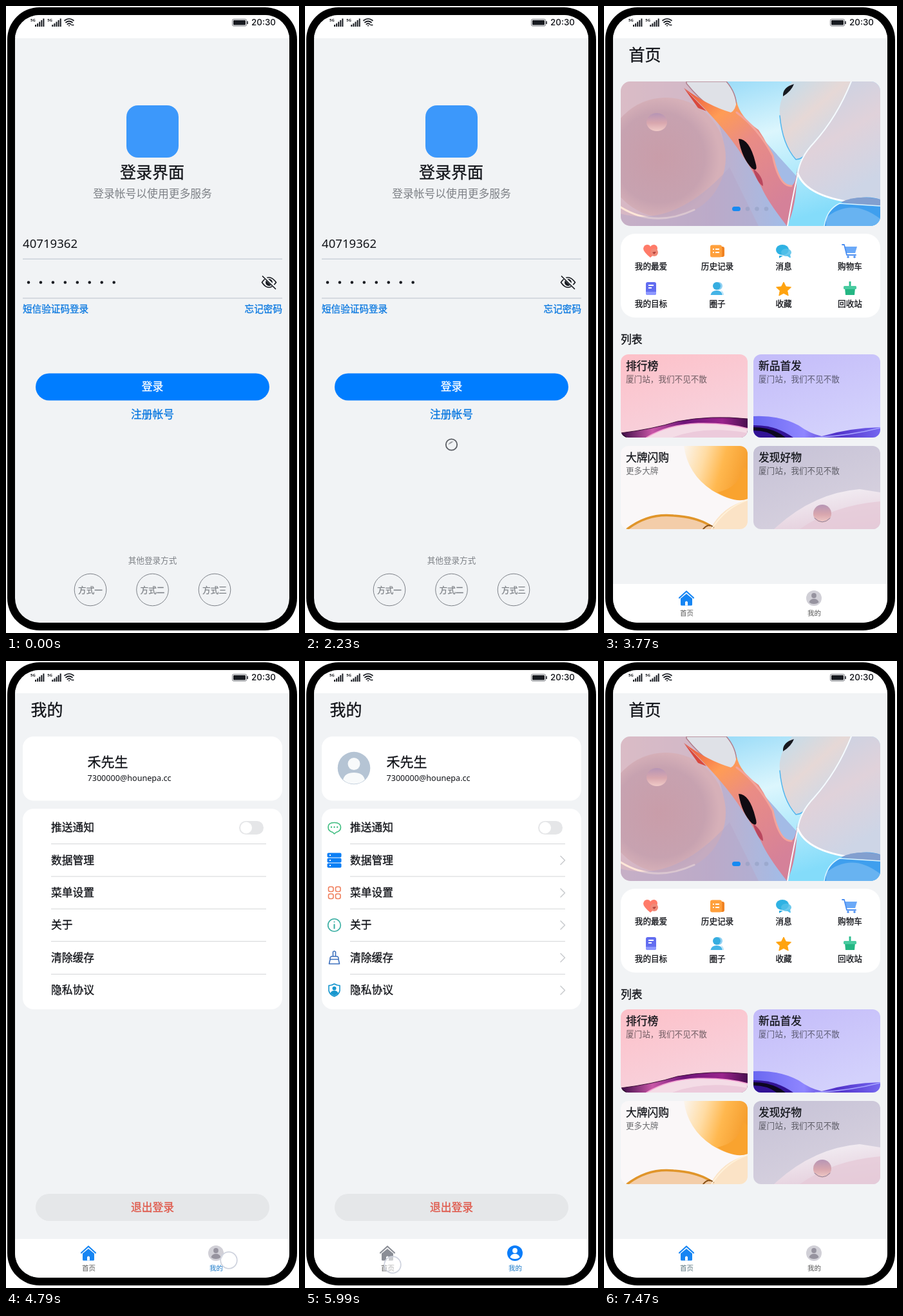
Recreate the animation shown at these times as an HTML page. Size 455 by 972 pixels, loop 8320 ms.

```html
<!DOCTYPE html>
<html lang="zh-CN">
<head>
<meta charset="utf-8">
<title>登录界面</title>
<style>
html,body{margin:0;width:100%;height:100%;overflow:hidden;background:#fff}
svg{display:block;width:100%;height:100%}
text{font-family:"Noto Sans CJK SC","Noto Sans CJK",sans-serif;transform:translateY(.34em);color:#111318;fill:currentColor}
.num{font-family:"Noto Sans","Open Sans",sans-serif;transform:translateY(.36em)}
.clock{font:500 13.4px Inter,sans-serif;transform:translateY(.36em)}
.mid{text-anchor:middle}
.end{text-anchor:end}
.h1{font-size:25px}
.h2{font-size:21px}
.body{font-size:16.8px}
.link{font-size:14.6px}
.small{font-size:12.6px}
.tiny{font-size:10.5px}
.h1,.h2,.link,.bold{stroke:currentColor;stroke-width:.3px}
.blue{color:#0a78e0}
.gray{color:#7d8086}
.white{color:#fff}
.red{color:#df5648}
.line{fill:none;stroke-linecap:round;stroke-linejoin:round}

/* 8320 ms loop: sign in, push the home page, visit the second tab, return */
.step,.login,.push,.ring{animation:8320ms infinite}
.step{animation-timing-function:step-end}
.login{animation-name:leave}
.push{animation-name:enter}
.home{animation-name:home}
.mine{animation-name:mine}
.late{animation-name:late}
.early{animation-name:early}
.press{animation-name:press}
.load{animation-name:load}
.comet{animation:spin 1188.57ms linear infinite}
.ring{animation-name:tap;animation-timing-function:linear}
.homeLabel{animation-name:homeLabel}
.mineLabel{animation-name:mineLabel}
@keyframes leave{
 0%,36.2%{transform:none;animation-timing-function:cubic-bezier(.2,0,.2,1)}
 43.5%,100%{transform:translateX(-110px)}}
@keyframes enter{
 0%,36.2%{transform:translateX(430px);animation-timing-function:cubic-bezier(.2,0,.2,1)}
 43.5%,100%{transform:none}}
@keyframes home{0%{visibility:visible}56.9%{visibility:hidden}73.1%,100%{visibility:visible}}
@keyframes mine{0%{visibility:hidden}56.9%{visibility:visible}73.1%,100%{visibility:hidden}}
@keyframes late{0%{visibility:hidden}58.2%{visibility:visible}73.1%,100%{visibility:hidden}}
@keyframes early{0%{visibility:visible}58.2%{visibility:hidden}73.1%,100%{visibility:visible}}
@keyframes press{0%{fill:#007dff}23.4%{fill:#0071e6}25.2%,100%{fill:#007dff}}
@keyframes load{0%{visibility:hidden}25.2%{visibility:visible}43.5%,100%{visibility:hidden}}
@keyframes spin{to{transform:rotate(360deg)}}
@keyframes homeLabel{0%{color:#555}73.1%{color:#1878c8}86.4%,100%{color:#57727c}}
@keyframes mineLabel{0%{color:#555}56.9%{color:#1878c8}73.1%,100%{color:#555}}
@keyframes tap{
 0%,15.6%{transform:translate(262px,640px);opacity:0}
 17%{opacity:1}
 21.5%{transform:translate(240px,598px)}
 24.4%{transform:translate(240px,598px);opacity:1}
 25.2%{transform:translate(240px,598px);opacity:0}
 25.3%,56.2%{transform:translate(340px,923px);opacity:0}
 57.3%,59.5%{transform:translate(346px,929px);opacity:1}
 60.3%{transform:translate(346px,929px);opacity:0}
 60.4%,69.8%{transform:translate(136px,936px);opacity:0}
 70.8%,73%{transform:translate(136px,936px);opacity:1}
 73.8%,100%{transform:translate(136px,936px);opacity:0}}
</style>
</head>
<body>
<svg viewBox="0 0 455 972" preserveAspectRatio="none">
<defs>
 <clipPath id="screen"><rect x="14" y="14" width="426" height="942" rx="38"/></clipPath>
 <clipPath id="bannerClip"><rect x="26" y="117" width="403" height="224" rx="15"/></clipPath>
 <clipPath id="cardClip"><rect width="197" height="129" rx="12"/></clipPath>
 <linearGradient id="haze"><stop stop-color="#d8b8c4"/><stop offset=".35" stop-color="#c2aec9"/><stop offset=".62" stop-color="#a3bbe6"/></linearGradient>
 <linearGradient id="sky" x2=".3" y2="1"><stop stop-color="#9bdcf8"/><stop offset=".4" stop-color="#dcf6fd"/><stop offset="1" stop-color="#84dcfa"/></linearGradient>
 <radialGradient id="orb" cx=".45" cy=".5"><stop stop-color="#c99da9"/><stop offset=".75" stop-color="#c7a2b0"/><stop offset="1" stop-color="#d6b0b8"/></radialGradient>
 <linearGradient id="ribbon" x2=".6" y2="1"><stop stop-color="#e8503c"/><stop offset=".28" stop-color="#ff9c55"/><stop offset=".52" stop-color="#ea8c85"/><stop offset="1" stop-color="#d58199"/></linearGradient>
 <linearGradient id="pearl" x2=".8" y2="1"><stop stop-color="#c0dcec"/><stop offset=".45" stop-color="#e6d8d6"/><stop offset="1" stop-color="#c4d9ee"/></linearGradient>
 <linearGradient id="pearl2" x2=".4" y2="1"><stop stop-color="#c3d2e6"/><stop offset=".55" stop-color="#e0d2da"/><stop offset="1" stop-color="#cdd5e6"/></linearGradient>
 <linearGradient id="bead" x2="0" y2="1"><stop stop-color="#b695b5"/><stop offset=".55" stop-color="#d9a7ae"/><stop offset="1" stop-color="#f0cbc8"/></linearGradient>
 <linearGradient id="pink" x2=".5" y2="1"><stop stop-color="#fdc0c8"/><stop offset="1" stop-color="#f7d3de"/></linearGradient>
 <linearGradient id="violet" x2=".5" y2="1"><stop stop-color="#c3bbf9"/><stop offset="1" stop-color="#d3d1fc"/></linearGradient>
 <linearGradient id="dusk" x2=".6" y2="1"><stop stop-color="#c5c1d6"/><stop offset="1" stop-color="#d8d2df"/></linearGradient>
 <linearGradient id="amber" y2=".25"><stop stop-color="#fbf5ee"/><stop offset=".35" stop-color="#ffdca4"/><stop offset=".65" stop-color="#ffb84f"/><stop offset="1" stop-color="#f69f30"/></linearGradient>
 <linearGradient id="foam" x1=".3" x2=".7" y2="1"><stop stop-color="#f3f0f5"/><stop offset="1" stop-color="#e4cddb"/></linearGradient>
 <linearGradient id="plum"><stop stop-color="#3b0a45"/><stop offset=".25" stop-color="#c957a7"/><stop offset=".5" stop-color="#6d1478"/><stop offset=".8" stop-color="#9a238c"/><stop offset="1" stop-color="#4a0e50"/></linearGradient>
 <linearGradient id="indigo"><stop stop-color="#6a68f1"/><stop offset=".4" stop-color="#8f86ff"/><stop offset=".65" stop-color="#5031c8"/><stop offset="1" stop-color="#7567f0"/></linearGradient>
 <g id="signal">
  <text class="num" x="38" y="22" font-size="6" font-weight="700">5G</text>
  <path d="M46 32v-3M49.1 32v-5M52.2 32v-7.5M55.3 32v-10M58.4 32v-12.5" stroke="#171a20" stroke-width="2"/>
 </g>
 <path id="chevron" d="M397-6.5l6.5 6.5-6.5 6.5" class="line" stroke="#c9cbce" stroke-width="1.5"/>
 <g id="house">
  <path d="M-9-2L0-9.5 9-2V10Q9 11.5 7.500 11.5H-7.500Q-9 11.5-9 10Z" fill="currentColor"/>
  <path d="M-11 0L0-9 11 0" class="line" stroke="#fff" stroke-width="3.4"/>
  <path d="M-11-.5L0-10.5 11-.5" class="line" stroke="currentColor" stroke-width="2.2"/>
  <path d="M-2 11.5V6Q0 3 2 6V11.5Z" fill="#fff"/>
 </g>
 <g id="person"><circle cy="-4" r="3.9"/><path d="M-7.5 6.5Q-6 1 0 1T7.5 6.5Q4 9 0 9T-7.5 6.5Z"/></g>
</defs>

<rect x="2" y="2" width="450" height="966" rx="50"/>
<g clip-path="url(#screen)">
<rect x="14" y="14" width="426" height="942" fill="#f1f3f5"/>

<g class="login">
 <rect x="187" y="154" width="81" height="81" rx="18" fill="#3c98fb"/>
 <text class="h1 mid" x="227" y="258">登录界面</text>
 <text class="body mid gray" x="227.5" y="291">登录帐号以使用更多服务</text>
 <text class="num" x="26" y="368" font-size="18.6">40719362</text>
 <path d="M26 392.3H429M26 453H429" stroke="#cbd2d9" stroke-width="1.5"/>
 <path d="M35 428.5H168.2" class="line" stroke="#171a20" stroke-width="4.6" stroke-dasharray="0 18.95"/>
 <g class="line" stroke="#171a20" stroke-width="1.7">
  <path d="M397.5 428.5Q408 413 419.5 428.5Q408 444 397.5 428.5Z"/>
  <circle cx="408.5" cy="428.5" r="4.6" fill="#171a20"/>
  <path d="M399.5 418.5l20 19.5" stroke="#f1f3f5" stroke-width="4"/>
  <path d="M398.5 419l20 19.5"/>
 </g>
 <text class="link blue" x="26" y="470">短信验证码登录</text>
 <text class="link blue end" x="429" y="470">忘记密码</text>
 <rect class="step press" x="46" y="569.5" width="363" height="42" rx="21" fill="#007dff"/>
 <text class="body bold mid white" x="227.5" y="590.5">登录</text>
 <text class="body bold mid blue" x="227.5" y="633.5">注册帐号</text>
 <g class="step load" transform="translate(227.5 680)">
  <circle r="8.7" fill="none" stroke="#5b5e64" stroke-width="1.8"/>
  <path class="comet" d="M-4-3.5Q2-6 6-1.2Q1-2-4-3.5Z" fill="#85878c"/>
 </g>
 <text class="small mid gray" x="227.5" y="859.5">其他登录方式</text>
 <g fill="none" stroke="#7c8087"><circle cx="131" cy="905" r="24.8"/><circle cx="227.5" cy="905" r="24.8"/><circle cx="324" cy="905" r="24.8"/></g>
 <g class="small bold mid"><text class="gray" x="131" y="906">方式一</text><text class="gray" x="227.5" y="906">方式二</text><text class="gray" x="324" y="906">方式三</text></g>
</g>

<g class="push">
<rect x="14" y="50" width="426" height="906" fill="#f1f3f5"/>

<g class="step home">
 <text class="h1" x="38.5" y="76">首页</text>
 <g clip-path="url(#bannerClip)">
  <rect x="26" y="117" width="403" height="224" fill="url(#haze)"/>
  <path d="M26 117H135Q180 165 186 215L170 280 26 200Z" fill="#dcbfc8" opacity=".55"/>
  <circle cx="96" cy="235" r="93" fill="url(#orb)"/>
  <path d="M20 308Q75 346 140 316" class="line" stroke="#ffe6d8" stroke-width="3"/>
  <path d="M26 322Q110 345 195 250L240 341H26Z" fill="#b6a7c9" opacity=".5"/>
  <path d="M190 117H429V341H284L300 265 205 160Z" fill="url(#sky)"/>
  <path d="M128 117H190Q210 140 205 168Q170 172 128 120Z" fill="#dfe1e7" stroke="#b17f8d" stroke-width="1.5"/>
  <path d="M124 127Q160 154 197 165Q204 162 206 148Q211 172 240 192Q256 215 267 248Q276 282 291 279Q299 274 300 250Q300 310 284 341Q254 303 244 280Q228 250 207 220Q178 178 124 127Z" fill="url(#ribbon)"/>
  <path d="M124 127L159 163 146 158Z" fill="#d9483c"/>
  <path d="M206 165Q240 190 262 232Q272 280 291 279" class="line" stroke="#f3a49b" stroke-width="3"/>
  <path d="M209 206Q226 206 235 242Q240 258 230 252Q214 236 209 206Z" fill="#100b12"/>
  <path d="M231 252Q247 263 247 279Q239 276 231 252Z" fill="#b9475e"/>
  <path d="M292 117Q270 143 273 170Q277 215 298 238Q315 236 330 208Q366 165 384 117Z" fill="url(#pearl)"/>
  <path d="M273 170Q277 215 298 238Q308 238 316 226" class="line" stroke="#50b5ee" stroke-width="1.5"/>
  <path d="M278 140Q277 126 295 121Q291 132 278 140Z" fill="#17191f"/>
  <path d="M384 117Q362 172 326 212Q304 235 301 260Q318 304 429 308V117Z" fill="url(#pearl2)"/>
  <path d="M384 117Q362 172 326 212Q304 235 301 260Q292 300 285 341" class="line" stroke="#f5fbff" stroke-width="2"/>
  <path d="M301 260Q318 304 429 308" class="line" stroke="#fff" stroke-width="3"/>
  <path d="M342 341Q348 306 390 298Q414 294 429 300V341Z" fill="#3f9fee"/>
  <path d="M368 304Q395 292 429 300V310Q395 309 368 304Z" fill="#829fcf"/>
  <path d="M345 328Q385 296 429 330V341H345Z" fill="#79bdf2" opacity=".7"/>
  <path d="M342 341Q346 315 366 306L429 310" class="line" stroke="#d9f4ff" stroke-width="1.5"/>
  <ellipse cx="82" cy="180" rx="16" ry="14" fill="url(#bead)"/>
  <rect x="199" y="311" width="13" height="7" rx="3.5" fill="#168af2"/>
  <g fill="#8f9cc0" opacity=".5"><circle cx="223" cy="314.5" r="3.3"/><circle cx="237.5" cy="314.5" r="3.3"/><circle cx="252" cy="314.5" r="3.3"/></g>
 </g>

 <rect x="26" y="353" width="403" height="130" rx="22" fill="#fff"/>
 <g transform="translate(73 380)"><path d="M-1 10Q-12 1-12-4Q-11-10-6-10Q-2-10-1-7Q1-10 5-10Q10-9 10-4Q10 1-1 10Z" fill="#ff7b69"/><circle cx="5" cy="2" r="6" fill="#f08a78"/><path d="M5 5l-3-3 3-1 3 0Z" fill="#b4453e"/></g>
 <g transform="translate(176 380)"><rect x="-2" y="-7" width="13" height="16" rx="3" fill="#f08322"/><rect x="-11" y="-9.5" width="18" height="19" rx="3" fill="#ffa03c"/><path d="M-7-3h2M-3-3h6M-7 2h2M-3 2h6" stroke="#fff" stroke-width="2"/></g>
 <g transform="translate(279 380)"><path d="M-7 7l0 4 6-4Z" fill="#27a9df"/><ellipse cx="-2" cy="-2" rx="10" ry="8" fill="#2fb2e3"/><path d="M4 6q5 5 7 4l-1-5Z" fill="#59c4ef"/><ellipse cx="4" cy="2" rx="8" ry="6" fill="#53bfe9" opacity=".85"/></g>
 <g transform="translate(382 380)"><path d="M-8-7H11L8 3H-6Z" fill="#6ba9f8"/><path d="M-12-10h3l4 16H9" class="line" stroke="#4b8ef0" stroke-width="1.8"/><circle cx="-3" cy="9" r="1.8" fill="#4b8ef0"/><circle cx="7" cy="9" r="1.8" fill="#4b8ef0"/></g>
 <g transform="translate(73 438)"><rect x="-8" y="-10" width="16" height="20" rx="3" fill="#626df0"/><path d="M-8 5H8V8Q8 10 5 10H-5Q-8 10-8 8Z" fill="#8e98ff"/><path d="M-4-5H4M-4-1H1" stroke="#fff" stroke-width="1.8"/></g>
 <g transform="translate(176 438)"><circle cx="2" cy="-4" r="6" fill="#8fd0f2"/><circle cx="-1" cy="-4" r="6" fill="#36ade0"/><path d="M-10.5 10Q-9 3-1 3T8 10Z" fill="#45b4e6"/><path d="M5 3Q9 4 10 10H9Q8 5 5 3Z" fill="#8fd0f2"/></g>
 <path transform="translate(279 439)" d="M0-11L3.5-4 11.5-3 5.7 2.5 7.2 10 0 6.3-7.2 10-5.7 2.5-11.5-3-3.5-4Z" fill="#ffa30f" stroke="#ffa30f" stroke-linejoin="round"/>
 <g transform="translate(382 438)"><path d="M0-11V-3" stroke="#32bf91" stroke-width="3"/><path d="M-8-1H8L7 10H-7Z" fill="#24b683"/><rect x="-10" y="-4" width="20" height="5" rx="1.5" fill="#49cba0"/></g>
 <g class="small bold mid">
  <text x="73" y="403.5">我的最爱</text><text x="176" y="403.5">历史记录</text><text x="279" y="403.5">消息</text><text x="382" y="403.5">购物车</text>
  <text x="73" y="461.5">我的目标</text><text x="176" y="461.5">圈子</text><text x="279" y="461.5">收藏</text><text x="382" y="461.5">回收站</text>
 </g>
 <text class="body bold" x="26" y="517.5">列表</text>

 <g transform="translate(26 540)" clip-path="url(#cardClip)">
  <rect width="197" height="129" fill="url(#pink)"/>
  <path d="M0 122Q50 116 88 104Q140 94 197 100V129H0Z" fill="url(#plum)"/>
  <path d="M40 129Q72 109 120 107Q165 106 197 115V129Z" fill="#f4dce6"/>
  <path d="M80 129Q130 110 197 122V129Z" fill="#eccadb"/>
  <path d="M40 129Q72 109 120 107Q165 106 197 115" class="line" stroke="#f5a2d3" stroke-width="1.5"/>
  <path d="M0 122Q50 116 88 104Q140 94 197 100" class="line" stroke="#3a0c35"/>
  <path d="M0 122l10 7H0Z" fill="#180516"/>
 </g>
 <g transform="translate(232 540)" clip-path="url(#cardClip)">
  <rect width="197" height="129" fill="url(#violet)"/>
  <path d="M0 96Q40 94 70 110Q88 123 106 127Q150 114 197 113V129H0Z" fill="url(#indigo)"/>
  <path d="M0 110Q34 109 62 129H0Z" fill="#321395"/>
  <path d="M0 113Q30 113 50 129H36Q22 118 0 118Z" fill="#0c0620"/>
  <path d="M96 129Q150 126 197 114" class="line" stroke="#a7a4ff" stroke-width="1.5"/>
 </g>
 <g transform="translate(26 682)" clip-path="url(#cardClip)">
  <rect width="197" height="129" fill="#faf7f8"/>
  <path d="M98 0Q104 44 142 69Q178 90 197 82V0Z" fill="url(#amber)"/>
  <path d="M150 72Q186 64 190 32L197 38V82Q174 87 150 72Z" fill="#f9a32f"/>
  <path d="M139 129Q158 93 197 84V129Z" fill="#fbe3c6"/>
  <path d="M10 129Q42 103 82 108Q120 111 146 129Z" fill="#f3cda9"/>
  <path d="M10 129Q42 104 82 108Q116 110 138 123" class="line" stroke="#e0952a" stroke-width="3.5"/>
  <path d="M128 129Q136 119 144 126" class="line" stroke="#8a5218" stroke-width="2"/>
  <path d="M141 129Q163 95 197 84" class="line" stroke="#fff1d9" stroke-width="2"/>
 </g>
 <g transform="translate(232 682)" clip-path="url(#cardClip)">
  <rect width="197" height="129" fill="url(#dusk)"/>
  <path d="M32 129Q92 73 165 67L197 72V129Z" fill="url(#foam)"/>
  <path d="M72 129Q124 92 197 86V129Z" fill="#e6cbd9" opacity=".8"/>
  <circle cx="107" cy="105" r="14" fill="url(#bead)"/>
  <path d="M95 112Q107 124 119 112" class="line" stroke="#887c9a"/>
 </g>
 <g class="body bold">
  <text x="34" y="558">排行榜</text><text x="240" y="558">新品首发</text>
  <text x="34" y="700">大牌闪购</text><text x="240" y="700">发现好物</text>
 </g>
 <g class="small" opacity=".6">
  <text x="34" y="579">厦门站，我们不见不散</text><text x="240" y="579">厦门站，我们不见不散</text>
  <text x="34" y="721">更多大牌</text><text x="240" y="721">厦门站，我们不见不散</text>
 </g>
</g>

<g class="step mine">
 <text class="h1" x="38.5" y="76">我的</text>
 <g fill="#fff"><rect x="26" y="117" width="403" height="99.5" rx="17"/><rect x="26" y="229" width="403" height="311" rx="17"/></g>
 <text class="h2" x="126.5" y="157">禾先生</text>
 <text class="num small" x="126.5" y="181">7300000@hounepa.cc</text>
 <path d="M70 283.5H404M70 334H404M70 384.3H404M70 434.6H404M70 485.5H404" stroke="#d4d6d8"/>
 <g class="body bold">
  <text x="70" y="258.5">推送通知</text><text x="70" y="309">数据管理</text><text x="70" y="359">菜单设置</text>
  <text x="70" y="409.5">关于</text><text x="70" y="460">清除缓存</text><text x="70" y="510.5">隐私协议</text>
 </g>
 <rect x="362" y="248" width="38" height="21" rx="10.5" fill="#e5e6e8"/><circle cx="373" cy="258.5" r="9" fill="#fff"/>
 <rect x="46" y="826" width="363" height="42" rx="21" fill="#e5e7e9"/>
 <text class="body bold mid red" x="227.5" y="847.5">退出登录</text>
</g>

<g class="step late">
 <circle cx="76" cy="166" r="25.3" fill="#b5c4d4"/>
 <g fill="#f8fafb"><circle cx="76" cy="159.5" r="9.5"/><path d="M59 184Q62 173 76 173T93 184Q86 190.5 76 190.5T59 184Z"/></g>
 <use href="#chevron" y="309"/><use href="#chevron" y="359.5"/><use href="#chevron" y="409.5"/><use href="#chevron" y="460"/><use href="#chevron" y="510.5"/>
 <g class="line" stroke-width="1.6">
  <path d="M43 265.5Q36 264 36 257.5Q36 250.5 45.5 250.5T55.5 257.5Q55.5 264 48.5 265.5L45.5 268Z" stroke="#3fbd80"/>
  <path d="M41 257.5h9.5" stroke="#3fbd80" stroke-width="2.4" stroke-dasharray="0 4.6"/>
  <g stroke="#ef7f5d"><rect x="36.5" y="350" width="7.5" height="7.5" rx="2.5"/><rect x="47.5" y="350" width="7.5" height="7.5" rx="2.5"/><rect x="36.5" y="361" width="7.5" height="7.5" rx="2.5"/><rect x="47.5" y="361" width="7.5" height="7.5" rx="2.5"/></g>
  <g stroke="#39aea2"><circle cx="45.5" cy="409.5" r="9.8"/><path d="M45.5 408.5v6M45.5 404.5v.1" stroke-width="2"/></g>
  <path d="M43.5 458V451q2-2.5 4 0V458M39 462.5Q38.5 458 42 458H49Q52.5 458 52 462.5ZM39 462.5L37.5 469.5H53.5L52 462.5" stroke="#3c70bd"/>
  <path d="M45.5 500.5Q50 503.5 54 503V511Q53 517 45.5 520Q38 517 37 511V503Q41 503.5 45.5 500.5Z" stroke="#1696ce"/>
 </g>
 <g fill="#0b7ff5"><rect x="34.5" y="297.5" width="22" height="7" rx="2"/><rect x="34.5" y="305.5" width="22" height="7" rx="2"/><rect x="34.5" y="313.5" width="22" height="7" rx="2"/></g>
 <path d="M38 301h2M38 309h2M38 317h2" stroke="#fff" stroke-width="2"/>
 <g fill="#1696ce"><circle cx="45.5" cy="507.5" r="3"/><path d="M39.5 515.5Q40 511 45.5 511T51.5 515.5L45.5 519Z"/></g>
</g>

<rect x="14" y="896" width="426" height="60" fill="#fff"/>
<g class="step early">
 <use href="#house" x="128" y="918" color="#1685f3"/>
 <g transform="translate(326 918)"><circle r="12" fill="#d1d0d7"/><use href="#person" fill="#96939f"/></g>
</g>
<g class="step late">
 <use href="#house" x="128" y="918" color="#8b8e96"/>
 <g transform="translate(326 918)"><circle r="12" fill="#0a7dfa"/><use href="#person" fill="#fff"/></g>
</g>
<text class="tiny mid step homeLabel" x="128.5" y="941">首页</text>
<text class="tiny mid step mineLabel" x="326.5" y="941">我的</text>
</g>

<rect x="14" y="14" width="426" height="36" fill="#fff"/>
<use href="#signal"/><use href="#signal" x="26.3"/>
<g class="line" stroke="#171a20" stroke-width="1.7"><path d="M91 22.5Q98 17 105 22.5M93 25.5Q98 21.5 103 25.5M95.2 28.3Q98 26 100.8 28.3"/><path d="M98 30.5v.1M102.5 29.5v.1M104.5 29.5v.1" stroke-width="2"/></g>
<rect x="351.5" y="20.5" width="22" height="10.5" rx="2" fill="none" stroke="#777a80"/><rect x="353" y="22" width="19" height="7.5" rx="1" fill="#171a20"/><path d="M375 23.5v4.5" stroke="#171a20" stroke-width="1.5"/>
<text class="clock" x="381" y="25.5">20:30</text>
<circle class="ring" r="12.8" fill="#fff" fill-opacity=".55" stroke="#cfd3de" stroke-width="1.8"/>
</g>
</svg>
</body>
</html>
```
